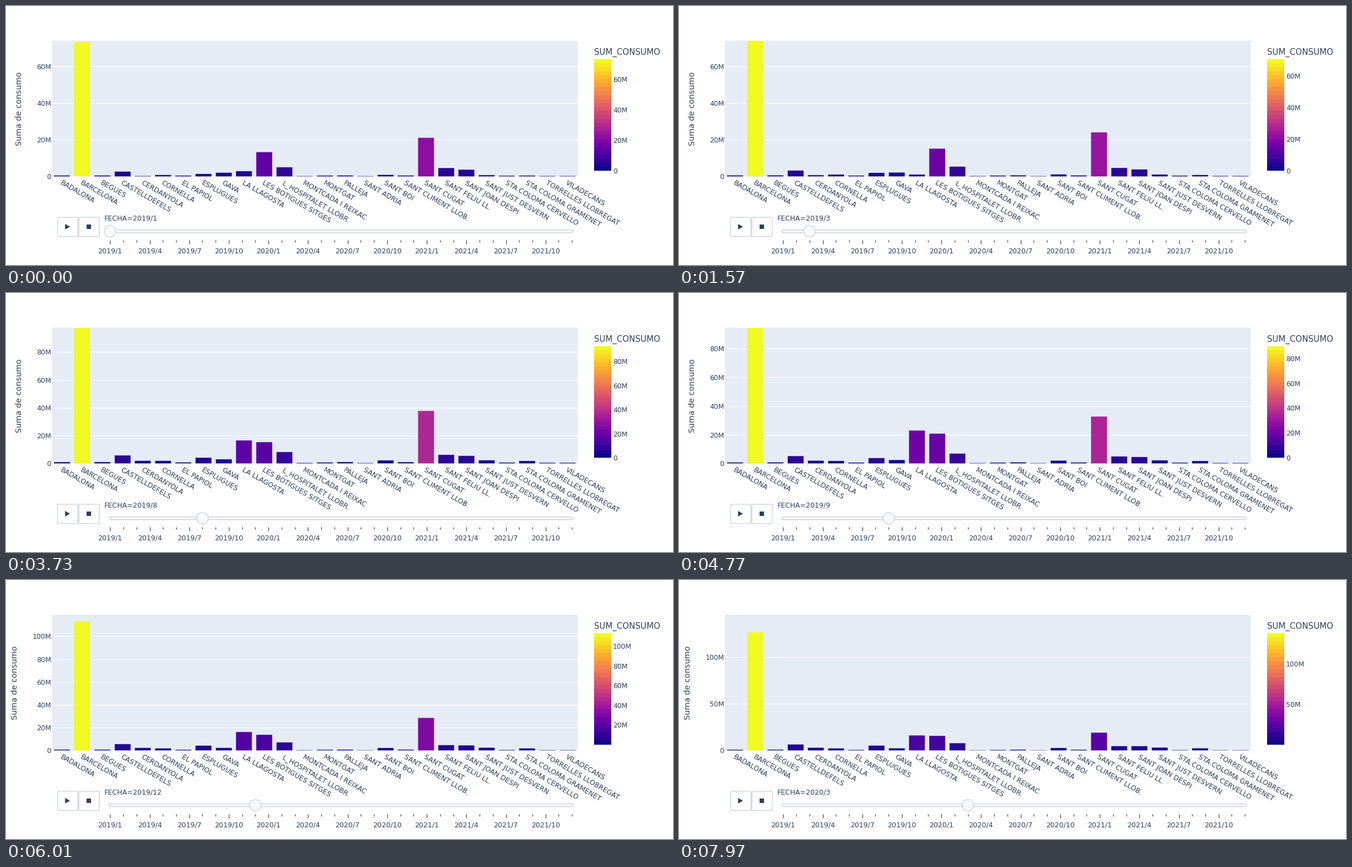
These frames come from a looping animation (1200 px wide and 467 px high, 8000 ms). A matplotlib script:

```python
import numpy as np
import matplotlib.pyplot as plt
from matplotlib.animation import FuncAnimation
from matplotlib.colors import LinearSegmentedColormap
from matplotlib.patches import Circle, FancyBboxPatch, Polygon, Rectangle

W, H, DPI = 1200, 467, 100
INTERVAL, FRAMES = 50, 160
PLAY_AT, MONTH_MS = 526, 533
LAST_MONTH = 14

LEFT, RIGHT, TOP, BASE = 82.5, 1028.5, 62.5, 307.5
BAR_TOP, BAR_BASE = 96, 297
RAIL_X, MONTH_PX, RAIL_Y = 187.3, 23.74, 406.2

INK, PANEL, BORDER, PALE = "#2a3f5f", "#e5ecf6", "#bec8d9", "#f8fafc"
PLASMA = LinearSegmentedColormap.from_list("plasma10", [
    "#0d0887", "#46039f", "#7201a8", "#9c179e", "#bd3786",
    "#d8576b", "#ed7953", "#fb9f3a", "#fdca26", "#f0f921"])

TOWNS = [
    "BADALONA", "BARCELONA", "BEGUES", "CASTELLDEFELS", "CERDANYOLA", "CORNELLA",
    "EL PAPIOL", "ESPLUGUES", "GAVA", "LA LLAGOSTA", "LES BOTIGUES SITGES",
    "L_HOSPITALET LLOBR.", "MONTCADA I REIXAC", "MONTGAT", "PALLEJA", "SANT ADRIA",
    "SANT BOI", "SANT CLIMENT LLOB.", "SANT CUGAT", "SANT FELIU LL.",
    "SANT JOAN DESPI", "SANT JUST DESVERN", "STA.COLOMA CERVELLO",
    "STA.COLOMA GRAMENET", "TORRELLES LLOBREGAT", "VILADECANS"]

# Turning points (month, millions) of the towns with a course of their own.
TURNS = {
    "BARCELONA": [(0, 73.3), (1, 70.35), (3, 78.2), (6, 92.6), (7, 89.7),
                  (10, 112.9), (11, 113.2), (13, 138), (14, 126.2)],
    "LA LLAGOSTA": [(0, 3), (2, 1.1), (8, 23.1), (10, 16.3)],
    "LES BOTIGUES SITGES": [(0, 13.4), (4, 17.2), (6, 14.6), (8, 21),
                            (10, 13.7), (14, 15.8)],
    "SANT CUGAT": [(0, 21.2), (2, 24.2), (4, 13.1), (6, 35.9), (10, 29.5), (14, 19.2)],
}
# First and last level of the towns that grow steadily.
GROWTH = {
    "CASTELLDEFELS": (2.8, 6.7), "CERDANYOLA": (.4, 3.2), "CORNELLA": (.9, 2.5),
    "ESPLUGUES": (1.5, 5.5), "GAVA": (2.2, 2.6), "L_HOSPITALET LLOBR.": (5.1, 8),
    "SANT BOI": (1, 2.8), "SANT FELIU LL.": (4.7, 4.9), "SANT JOAN DESPI": (3.8, 4.9),
    "SANT JUST DESVERN": (.8, 3.3), "STA.COLOMA GRAMENET": (.6, 2.6),
}
rng = np.random.default_rng(4)
SMALL = {town: rng.uniform(.1, .7) for town in TOWNS}


def consumption(town, month):
    if town in TURNS:
        return np.interp(month, *zip(*TURNS[town]))
    first, last = GROWTH.get(town, (SMALL[town], 1.5 * SMALL[town]))
    summer = 1 + .25 * np.exp(-((month - 6) / 1.5) ** 2)
    return (first + (last - first) * month / LAST_MONTH) * summer


def peak(month):
    return consumption("BARCELONA", max(month, 0))


def axis_range(step):
    return 74.05 if step < 2 else peak(step - 1) / .95


def month_name(k):
    return f"{2019 + k // 12}/{k % 12 + 1}"


def px(size):
    return size * 72 / DPI


plt.rcParams["font.family"] = "DejaVu Sans"
fig = plt.figure(figsize=(W / DPI, H / DPI), dpi=DPI, facecolor="white")
ax = fig.add_axes([0, 0, 1, 1])
ax.axis("off")


def text(x, y, label, size, ha="left", va="center_baseline", **kw):
    return ax.text(x, y, label, fontsize=px(size), color=INK, ha=ha, va=va, **kw)


def line(x0, y0, x1, y1, color, width, z):
    return ax.plot([x0, x1], [y0, y1], color=color, lw=px(width),
                   solid_capstyle="butt", zorder=z)[0]


def rounded(x, y, w, h, r, fill):
    ax.add_patch(FancyBboxPatch((x, y), w, h, fc=fill, ec=BORDER, lw=px(1.1),
                                boxstyle=f"round,pad=0,rounding_size={r}", zorder=5))


# Plot panel, grid and bars
panel = Rectangle((LEFT, TOP), RIGHT - LEFT, BASE - TOP, fc=PANEL, lw=0,
                  snap=False, zorder=0)
ax.add_patch(panel)
grid = [line(LEFT, BASE, RIGHT, BASE, "white", 1.1 if i else 2, 1) for i in range(6)]
y_ticks = [text(81.5, BASE, "", 12.2, "right") for _ in grid]
y_title = text(24, 185, "Suma de consumo", 14.4, "center", "center", rotation=90)

slot = (RIGHT - LEFT) / len(TOWNS)
bars = []
for i, town in enumerate(TOWNS):
    center = LEFT + slot * (i + .5)
    bar = Rectangle((center - .4 * slot, BASE), .8 * slot, 0,
                    ec=PANEL, lw=px(.5), snap=False, zorder=3)
    ax.add_patch(bar)
    bar.set_clip_path(panel)
    bars.append(bar)
    text(center - 4.3, 321, town, 12.55, va="baseline",
         rotation=-30, rotation_mode="anchor", zorder=4)

# Colour scale
ax.imshow(np.linspace(1, 0, 28)[:, None], cmap=PLASMA, aspect="auto",
          extent=(1058, 1089, BAR_BASE, BAR_TOP), interpolation="nearest")
text(1058, 81.5, "SUM_CONSUMO", 14.9)
c_ticks = [text(1092, BAR_BASE, "", 12.2) for _ in grid]

# Buttons and slider
rounded(92.8, 381, 36.6, 34.7, 2, "white")
rounded(131.2, 381, 36.6, 34.7, 2, "white")
ax.add_patch(Polygon([(106.3, 393), (115, 398), (106.3, 403)], fc=INK, lw=0, zorder=6))
ax.add_patch(Rectangle((145.4, 394.3), 7.2, 7.2, fc=INK, lw=0, zorder=6))
rounded(185.2, 403.7, 835, 5, 2.4, PALE)
grip = Circle((RAIL_X, RAIL_Y), 10.3, fc=PALE, ec=BORDER, lw=px(1.1), zorder=7)
ax.add_patch(grip)
date = text(177, 381.2, "", 12.5, zorder=6)
for k in range(36):
    x = RAIL_X + k * MONTH_PX
    line(x, 422, x, 426 if k % 3 else 429, "#333333", 1.1, 5)
    if k % 3 == 0:
        text(x, 440.5, month_name(k), 12.5, "center")

ax.set_xlim(0, W)
ax.set_ylim(H, 0)


def place_ticks(labels, top, y0, y1, show_zero=True):
    gap = 50 if top > 125 else 20
    for i, label in enumerate(labels):
        value = i * gap
        label.set_y(y0 - (y0 - y1) * value / top)
        label.set_text(f"{value}M" if value else "0")
        label.set_visible(value <= top and (i > 0 or show_zero))


def update(frame):
    t = (frame + .5) * INTERVAL
    step = int((t - PLAY_AT) // MONTH_MS) + 1 if t >= PLAY_AT else 0
    shown = max(step - 1, 0)
    since = t - PLAY_AT - shown * MONTH_MS
    month = shown + since / MONTH_MS if step else 0
    top, color_max = axis_range(step), peak(shown)

    # Bars rescale one frame after the axis; colours change only once a month.
    late = step > 0 and since < INTERVAL
    bar_range = axis_range(step - 1) if late else top
    for town, bar in zip(TOWNS, bars):
        value = consumption(town, shown if late else month)
        bar.set_height(-(BASE - TOP) * value / bar_range)
        bar.set_facecolor(PLASMA(float(consumption(town, shown) / color_max)))

    place_ticks(y_ticks, top, BASE, TOP)
    for rule, label in zip(grid, y_ticks):
        y = label.get_position()[1]
        rule.set_ydata([y, y])
        rule.set_visible(label.get_visible())
    y_title.set_x(24 if top < 100 else 16.5)
    place_ticks(c_ticks, color_max, BAR_BASE, BAR_TOP, step < 10)

    grip.center = (RAIL_X + step * MONTH_PX, RAIL_Y)
    date.set_text("FECHA=" + month_name(step))
    return bars


anim = FuncAnimation(fig, update, frames=FRAMES, interval=INTERVAL,
                     repeat=True, repeat_delay=0, blit=False)
plt.show()
```
